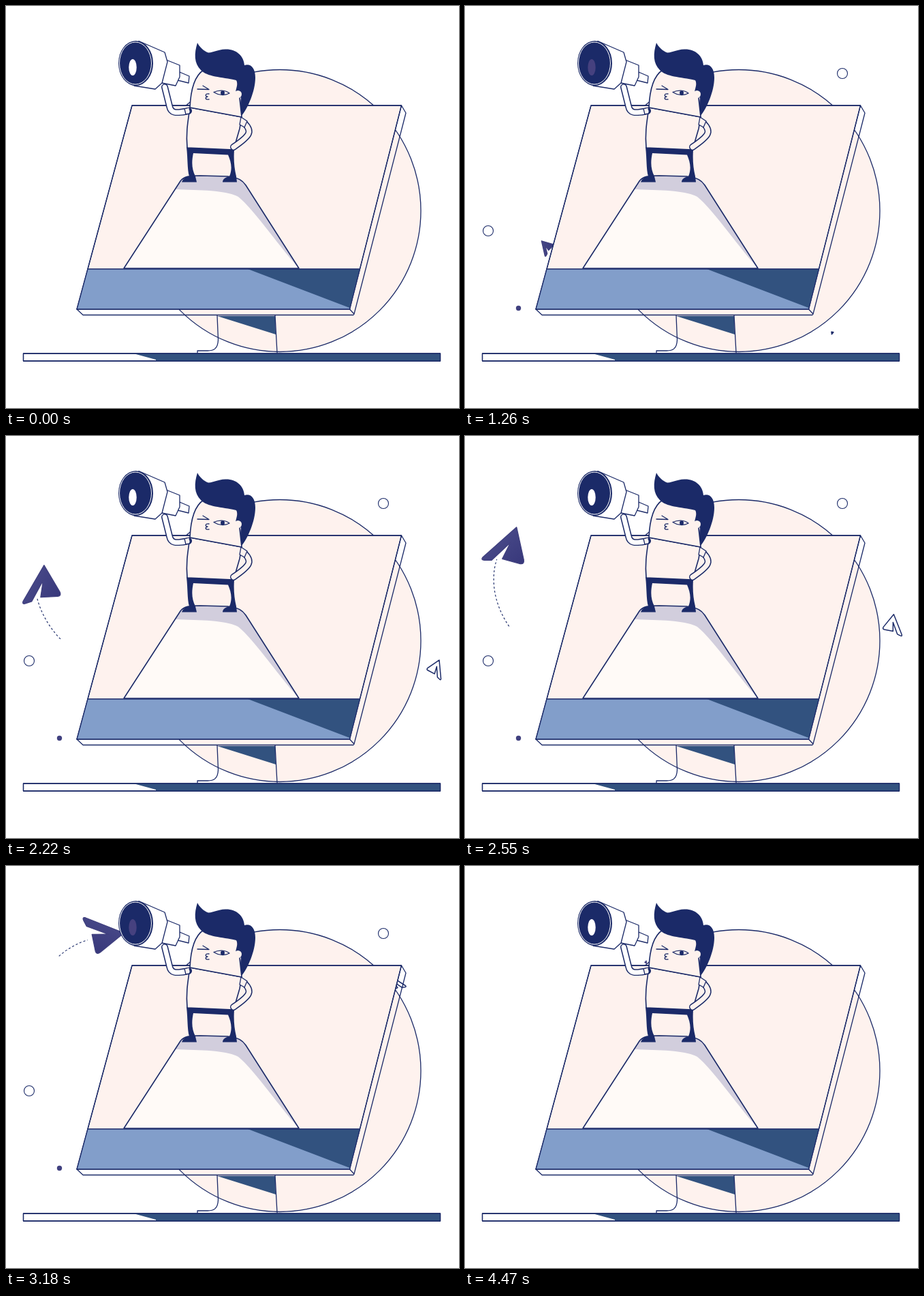
An HTML page that plays this animation: 665x590 px, repeating every 4.5 s.

```html
<!DOCTYPE html>
<html>
<head>
<meta charset="utf-8">
<style>
html, body { margin: 0; width: 100%; height: 100%; overflow: hidden; background: #fff; }
svg { display: block; }
.n { fill: #1b2a68; stroke: none; }
.w { fill: #fff; }
.b { fill: #fef2ee; }
.d { fill: #32527f; stroke: none; }
</style>
</head>
<body>
<svg width="665" height="590" viewBox="0 0 665 590" fill="none" stroke="#1b2a68" stroke-width="1.3" stroke-linejoin="round" stroke-linecap="round">
  <defs>
    <linearGradient id="shade" x1="0" y1="0" x2="0" y2="1">
      <stop offset="0" stop-color="#454686"/><stop offset="1" stop-color="#38387b"/>
    </linearGradient>
    <path id="wing" d="M0 0L-67 0Q-72 1 -68 5L-60 12L-22 11L-47 21L-32 44Q-28 49 -24 43Z" vector-effect="non-scaling-stroke"/>
    <path id="leftPath" d="M160 395C110 345 54 290 54 227C54 180 64 152 90 124C120 96 160 98 197 105C225 110 255 125 266 142"/>
    <path id="rightPath" d="M487 516C560 468 631 415 631 325C631 230 590 180 513 129C490 116 460 130 445 160"/>
    <path id="route" d="M80 298C45 262 35 215 47 180C57 148 80 125 110 112C140 100 165 105 190 110"/>
    <mask id="reveal" maskUnits="userSpaceOnUse" x="0" y="0" width="665" height="590">
      <use id="window" href="#route" stroke="#fff" stroke-width="6" stroke-linecap="butt"/>
    </mask>
    <clipPath id="lids"><rect id="gap" x="170" width="32"/></clipPath>
  </defs>

  <!-- flying parts -->
  <g mask="url(#reveal)"><use href="#route" stroke-width="1.1" stroke-dasharray="3 3" stroke-linecap="butt"/></g>
  <g id="left"><use href="#wing" fill="url(#shade)" stroke="#40407f" transform="translate(35 -18)"/></g>
  <g id="right"><use href="#wing" fill="#fff" stroke-width="1.5" transform="translate(-35 -18) scale(-1 1)"/></g>
  <circle id="ringL" cx="34" cy="330" r="7.5" stroke-width="1.1"/>
  <circle id="ringR" cx="554" cy="99" r="7.5" stroke-width="1.1"/>
  <circle id="dot" cx="78.500" cy="443.500" r="3.700" fill="#40407f" stroke="none"/>

  <!-- disc, stand and base -->
  <circle class="b" cx="402" cy="300.500" r="207"/>
  <path class="d" d="M310 455H395L396 482Z"/>
  <path d="M310 454L311.500 490C311 503 305 506 296 506H281V510M395 454L398 509"/>
  <path class="w" d="M25.500 510H637.500V521H25.500Z"/>
  <path class="d" d="M187 510H637.500V521H220V519Z"/>
  <path d="M25.500 510H637.500V521H25.500Z"/>

  <!-- monitor -->
  <path d="M580.500 146L587 157L511 452L504.500 445M104 445L113 453.500H510L511 452"/>
  <path class="b" d="M185 146H580.500L504.500 445H104Z"/>
  <path d="M120 386H519L504.500 445H104Z" fill="#829eca" stroke="none"/>
  <path class="d" d="M355 386H519L504.500 443Z"/>
  <path d="M120 386H519M185 146H580.500L504.500 445H104Z"/>

  <!-- hill -->
  <path fill="#fffaf7" stroke="none" d="M173 385L256 257C261 250 270 249 285 249L325 250C342 252 347 256 352 263L430 385Z"/>
  <path fill="#d2cedd" stroke="none" d="M248 269L256 257C261 250 270 249 285 249L325 250C342 252 347 256 352 263L429 384C395 345 365 300 341 280C326 271 290 270 248 269Z"/>
  <path stroke-width="1.6" d="M173 385L256 257C261 250 270 249 285 249L325 250C342 252 347 256 352 263L430 385Z"/>

  <!-- legs and body -->
  <path class="n" d="M265 207L335 211C334 225 335 238 338 250L339 258.500H318C318 253 324 251 328 250C333 238 330 228 326 218.500L275 216C272 230 273 240 278 250L280 258.500H258C260 253 264 251 269 250C266 240 267 225 265 207Z"/>
  <path class="b" stroke-width="1.6" d="M270 149L346 163L343 180L334 211L266 208C264 185 267 170 270 149Z"/>
  <path class="b" stroke-width="1.6" d="M270 149C271 125 276 103 290 94L340 108L346 163Z"/>
  <path class="n" d="M281 54C276 70 276 84 286 94C295 104 316 104 338 109C341 114 338 120 337 126L345 135C343 145 345 153 346 161C355 150 366 125 366 105C366 92 360 84 350 87C349 73 338 63 322 63.500C310 64 306 68 297 68.500C290 66 284 60 281 54Z"/>
  <circle class="b" stroke="none" cx="340.500" cy="129.500" r="5.500"/>
  <path stroke-width="1.3" d="M281 122L298 122.500L289 117M298 129C292 128 292 133 296 133C292 134 292 138 298 137M305 126.500C312 123 322 123 328 128C321 132 312 131 305 126.500"/>
  <ellipse class="n" cx="318" cy="127.500" rx="3" ry="3"/>

  <!-- arms -->
  <path stroke-width="10" d="M350 172C362 184 359 190 334 207"/>
  <path stroke="#fef2ee" stroke-width="7" d="M350 172C362 184 359 190 334 207"/>
  <path class="b" d="M345 163L354 169L350 178L343 174Z"/>
  <path stroke-width="10" d="M268 154C248 158 242 157 240 147L233 119"/>
  <path stroke="#fff" stroke-width="7" d="M266 154.500C248 158 242 157 240 147L233 119"/>
  <path class="b" d="M269 149L262 151L264 159L267 158"/>

  <!-- telescope -->
  <path class="w" d="M255 97L269 103L268 113L252 109Z"/>
  <path class="w" d="M235 79L255 87V104L249 117L229 113Z"/>
  <path class="w" d="M195 51.500L233 68L237 82L229 113L219 122L188 117Z"/>
  <ellipse class="n" cx="190.500" cy="84" rx="25.500" ry="33"/>
  <ellipse cx="190" cy="84" rx="23.500" ry="31" stroke="#fff" stroke-width="1"/>
  <ellipse cx="186" cy="90" rx="5.700" ry="12" fill="#46417f" stroke="none"/>
  <ellipse cx="186" cy="90" rx="5.700" ry="12" fill="#fff" stroke="none" clip-path="url(#lids)"/>
</svg>
<script>
const LOOP = 4500, STEP = 30, BLINK = 2130;
const $ = id => document.getElementById(id);
const clamp = (v, lo, hi) => Math.min(hi, Math.max(lo, v));
const ramp = (t, from, to) => clamp((t - from) / (to - from), 0, 1);
const glide = p => p + p ** 3 * (1 - p);

// puts a plane on its path, turned along the direction of travel
function fly(id, p, turn, scale) {
  const path = $(id + 'Path'), at = glide(p) * path.getTotalLength();
  const a = path.getPointAtLength(at - 2), b = path.getPointAtLength(at + 2);
  const angle = Math.atan2(b.y - a.y, b.x - a.x) * 180 / Math.PI + turn;
  $(id).style.display = scale > 0.01 ? '' : 'none';
  $(id).setAttribute('transform', `translate(${(a.x + b.x) / 2} ${(a.y + b.y) / 2}) rotate(${angle}) scale(${scale})`);
}

// grows a circle from its centre and shrinks it at the end
function pop(id, t, from, to) {
  const size = ramp(t, from, to) - ramp(t, 3600, 3960);
  const c = $(id), x = c.getAttribute('cx'), y = c.getAttribute('cy');
  c.style.display = size > 0 ? '' : 'none';
  c.setAttribute('transform', `translate(${x} ${y}) scale(${size}) translate(${-x} ${-y})`);
}

function draw(now) {
  const t = Math.floor(now % LOOP / STEP) * STEP;

  const p = ramp(t, 860, 4530), swell = Math.sin(Math.PI * p);
  fly('left', p, 30, swell);
  fly('right', p, 168, 0.49 * swell ** 2);

  pop('ringL', t, 240, 690);
  pop('dot', t, 240, 690);
  pop('ringR', t, 480, 840);

  const half = clamp(6.5 + 9 * Math.cos(2 * Math.PI * (t - 225) / BLINK), 0, 13);
  $('gap').setAttribute('y', 91 - half);
  $('gap').setAttribute('height', 2 * half);

  const head = Math.max(0, t - 1800) * 0.17, tail = Math.max(0, t - 2220) ** 2 / 5000;
  $('window').setAttribute('stroke-dasharray', `0 ${tail} ${Math.max(0, head - tail)} 999`);
}

const start = performance.now();
function frame() {
  draw(performance.now() - start);
  requestAnimationFrame(frame);
}
frame();
</script>
</body>
</html>
```
